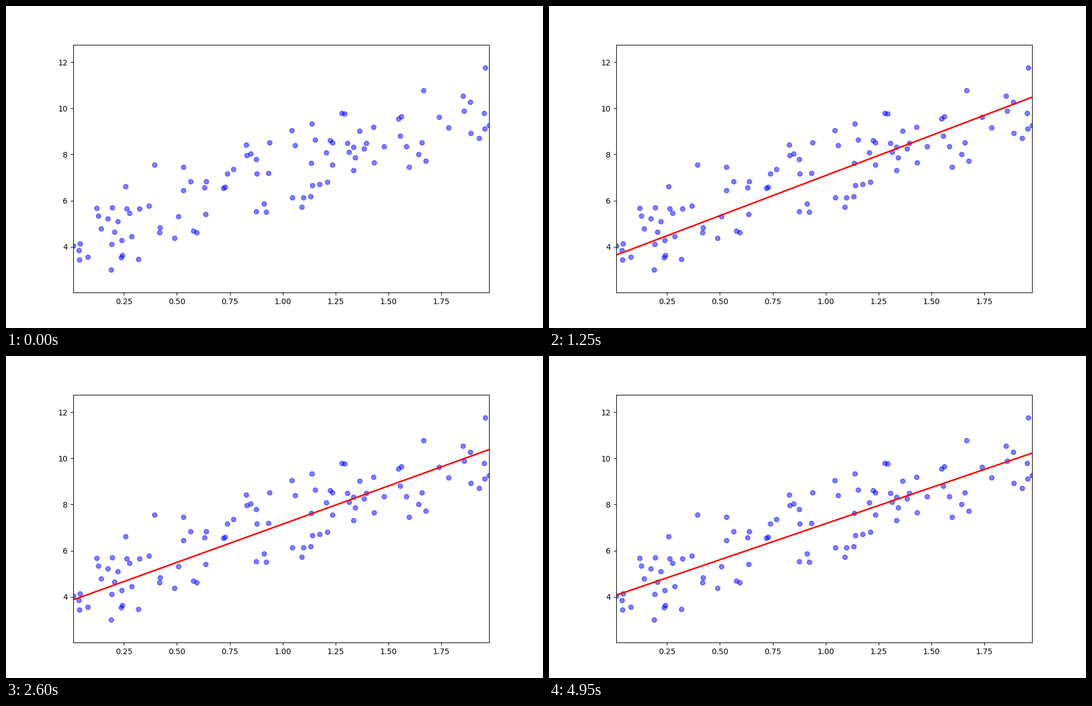
A matplotlib script that plays this animation: 966x580 px, repeating every 5000 ms.

```python
import matplotlib.pyplot as plt
import numpy as np
from matplotlib.animation import FuncAnimation

FRAMES = 100
INTERVAL = 50
STEPS_PER_FRAME = 5
RATE = 0.01

plt.rcParams["font.family"] = "DejaVu Sans"

# Noisy samples of y = 4 + 3x
np.random.seed(0)
x = 2 * np.random.rand(100, 1)
y = 4 + 3 * x + np.random.randn(100, 1)
design = np.c_[np.ones_like(x), x]


def descend():
    """Return the line parameters for every frame of the descent."""
    theta = np.zeros((2, 1))
    path = []
    for step in range(FRAMES * STEPS_PER_FRAME):
        if step % STEPS_PER_FRAME == 0:
            path.append(theta)
        gradient = 2 / len(x) * design.T @ (design @ theta - y)
        theta = theta - RATE * gradient
    return path


path = descend()
ends = np.array([x.min(), x.max()])

fig, ax = plt.subplots(figsize=(9.66, 5.8), dpi=100)
ax.scatter(x, y, color="blue", alpha=0.5)
line, = ax.plot([], [], color="red", lw=2)
ax.set_xlim(x.min(), x.max())
ax.set_ylim(y.min() - 1, y.max() + 1)


def update(frame):
    intercept, slope = path[frame].ravel()
    line.set_data(ends, intercept + slope * ends)
    return line,


anim = FuncAnimation(fig, update, frames=FRAMES, interval=INTERVAL,
                     repeat=True, repeat_delay=0)
plt.show()
```
